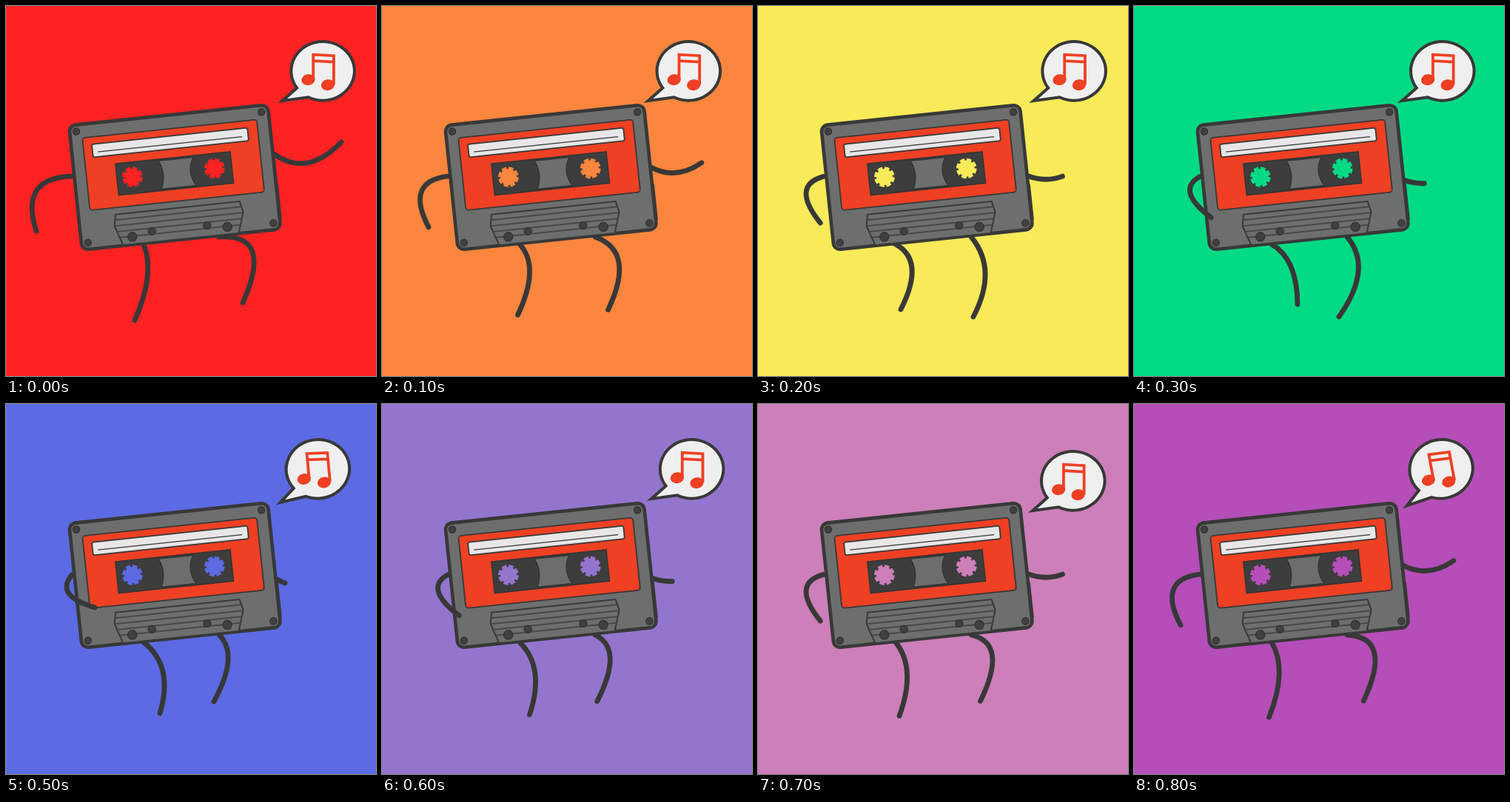
An HTML page for the animation above (900 ms loop, 500 px wide and 500 px high).

```html
<!DOCTYPE html>
<html lang="en">
<head>
<meta charset="utf-8">
<title>Dancing cassette</title>
<style>
  html, body { margin: 0; width: 100%; height: 100%; overflow: hidden; }
  svg { display: block; width: 100%; height: 100%; background: var(--bg); }
  .limb { fill: none; stroke: #383838; stroke-width: 6.8; stroke-linecap: round; }
  .line { stroke: #383838; stroke-width: 1.8; }
  .knob { fill: #404040; stroke: #343434; stroke-width: 1.4; }
  .hole { fill: var(--bg); }
  .teeth { fill: none; stroke: #3d3d3d; stroke-width: 3.6; stroke-dasharray: .3 .7; stroke-dashoffset: .15; }
</style>
</head>
<body>
<svg viewBox="0 0 500 500">
  <defs>
    <g id="reel">
      <circle class="hole" r="13.8"/>
      <circle class="teeth" r="12.8" pathLength="8"/>
    </g>
  </defs>

  <path class="limb" id="leftLeg"/>
  <path class="limb" id="rightLeg"/>
  <path class="limb" id="rightArm"/>

  <g transform="translate(228.2 231.5) rotate(-6)">
    <rect x="-135" y="-84.5" width="270" height="169" rx="9" fill="#6d6e6e" stroke="#383838" stroke-width="4.6"/>
    <path d="M135.8 25v46" stroke="#383838" stroke-width="4.2" stroke-linecap="round"/>
    <g class="knob">
      <circle cx="-126" cy="-75.5" r="4.6"/>
      <circle cx="125.5" cy="-75.5" r="4.6"/>
      <circle cx="-126" cy="75.5" r="4.6"/>
      <circle cx="126" cy="75.5" r="4.6"/>
    </g>

    <rect class="line" x="-118.8" y="-66" width="237" height="98.4" rx="4" fill="#ef4023"/>
    <rect class="line" x="-107" y="-56.2" width="211.4" height="17.6" rx="2.5" fill="#e8e6e6"/>
    <path d="M-100-45H96" stroke="#383838" stroke-width="1.3"/>

    <g stroke="#343434" stroke-width="1.6">
      <rect x="-78" y="-26.5" width="156" height="42.5" fill="#3d3d3d"/>
      <path d="M-20-24.5A42 42 0 0 1-20 14H28A33 33 0 0 1 28-24.5Z" fill="#6d6e6e"/>
    </g>
    <use href="#reel" x="-57" y="-6.4"/>
    <use href="#reel" x="54.5" y="-6.4"/>

    <path d="M-85 41.5H83.5L87 56 78 84H-79L-88 57Z" fill="#6d6e6e" stroke="#383838" stroke-width="2"/>
    <path d="M-86 49H85M-87 57H86M-85 65H84M-82 73H81" stroke="#484848" stroke-width="2"/>
    <g class="knob">
      <circle cx="-65.6" cy="74" r="6"/>
      <circle cx="-38.5" cy="69.3" r="5"/>
      <circle cx="36.5" cy="69.3" r="5"/>
      <circle cx="63.6" cy="74" r="6"/>
    </g>
  </g>

  <path class="limb" id="leftArm"/>

  <g id="bubble">
    <path d="M-34.8 23.6A42.8 39.8 0 1 1-19.5 36L-54.5 41Z" fill="#efefef" stroke="#383838" stroke-width="4"/>
    <g fill="#ef4023">
      <ellipse cx="-19.5" cy="12.5" rx="9.2" ry="7.4" transform="rotate(-8 -19.5 12.5)"/>
      <ellipse cx="7" cy="19.5" rx="9.2" ry="7.4" transform="rotate(-8 7 19.5)"/>
    </g>
    <path d="M-12.7 12V-21.5L15-20V19M-12.7-13L15-11.5" fill="none" stroke="#ef4023" stroke-width="3.8"/>
  </g>
</svg>

<script>
const STEP = 100;
const COLORS = ['#ff2222', '#fc863d', '#f8ea58', '#00da84', '#2ea3b4',
                '#5c6ae3', '#9475ce', '#cc7fb8', '#b54eb8'];
const COUNT = COLORS.length;

// Feet pass through these poses (knee, foot) at the given steps and return to the first.
const STRIDE = [0, 2, 3, 5, COUNT];
const LEFT_LEG = [[191, 367, 174, 425], [208, 355, 193, 410], [212, 352, 221, 403], [212, 362, 208, 418]];
const RIGHT_LEG = [[333, 332, 320, 401], [307, 361, 291, 420], [303, 360, 277, 420], [300, 348, 281, 402]];

const byId = id => document.getElementById(id);
const mix = (a, b, t) => a + (b - a) * t;

// Draws a smooth bend from a root through a joint at its middle to a tip.
function drawLimb(id, [x, y, jointX, jointY, tipX, tipY]) {
  const bendX = 2 * jointX - (x + tipX) / 2;
  const bendY = 2 * jointY - (y + tipY) / 2;
  byId(id).setAttribute('d', `M${x} ${y}Q${bendX} ${bendY} ${tipX} ${tipY}`);
}

// Arms swing from folded to stretched; the exponent curves the path of the hand.
function arm(folded, stretched, swing, exponent) {
  return folded.map((v, i) => mix(v, stretched[i], i % 2 ? swing ** exponent : swing));
}

function leg(hip, poses, step) {
  const next = STRIDE.findIndex(s => s > step);
  const t = (step - STRIDE[next - 1]) / (STRIDE[next] - STRIDE[next - 1]);
  const target = poses[next % poses.length];
  return [...hip, ...poses[next - 1].map((v, i) => mix(v, target[i], t))];
}

function drawBubble(step) {
  const bar = Math.floor(step / 3);
  const beat = step % 3;
  const x = 421 + 7 * Math.cos(step * Math.PI * 8 / 9 + 0.15);
  const y = 87.2 + (beat === 1 ? 8 * bar : 0);
  const tilt = beat === 2 ? -5.25 * bar : 0;
  byId('bubble').setAttribute('transform', `translate(${x} ${y}) rotate(${tilt})`);
}

function draw() {
  const step = Math.floor(performance.now() / STEP) % COUNT;
  const swing = Math.max(0, (Math.abs(step - COUNT / 2) - 0.6) / 3.9) ** 1.1;
  document.documentElement.style.setProperty('--bg', COLORS[step]);
  drawLimb('leftArm', arm([89, 231, 85, 256, 120, 275], [88, 230, 41, 250, 41, 304], swing, 0.6));
  drawLimb('rightArm', arm([366, 237, 372, 240, 377, 242], [362, 200, 407, 212, 453, 184], swing, 2));
  drawLimb('leftLeg', leg([186, 322], LEFT_LEG, step));
  drawLimb('rightLeg', leg([288, 312], RIGHT_LEG, step));
  drawBubble(step);
  requestAnimationFrame(draw);
}
draw();
</script>
</body>
</html>
```
